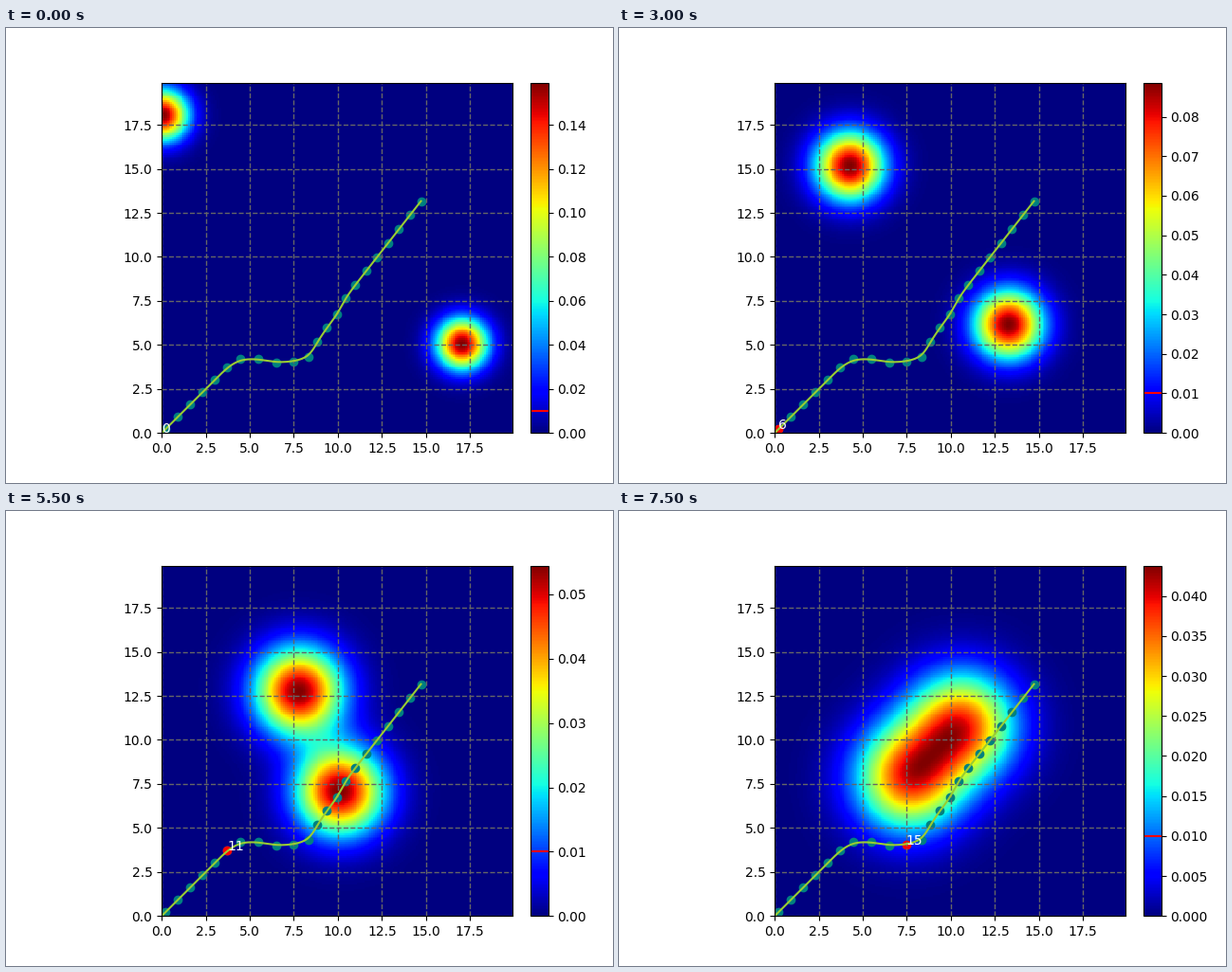
Write a matplotlib script that moves like this. It is 640 px wide and 480 px high and loops after 8 s.

```python
import numpy as np
import matplotlib.pyplot as plt
from matplotlib.animation import FuncAnimation

W, H, DPI = 640, 480, 100
STEPS = 16
START = 6          # step at which the walker sets off
LEVEL = 0.01       # threshold marked on the colorbar

grid = np.arange(0, 20, 0.1)
X, Y = np.meshgrid(grid[:-1], grid[:-1])

# (start, goal) of each moving obstacle, travelled in 27 steps
OBSTACLES = [((0, 18), (19, 5)), ((17, 5), (0, 10))]


def density(t):
    """Sum of two drifting Gaussians whose spread grows 5% per step."""
    var = 1.05 ** (2 * t)
    z = np.zeros_like(X)
    for a, b in OBSTACLES:
        cx, cy = np.array(a) + (np.array(b) - a) * t / 27
        z += np.exp(-((X - cx) ** 2 + (Y - cy) ** 2) / (2 * var))
    return z / (2 * np.pi * var)


def waypoints():
    climb = [(0.22 + 0.702 * k, 0.22 + 0.702 * k) for k in range(6)]
    bend = [(4.48, 4.2), (5.5, 4.2), (6.48, 4.0), (7.45, 4.05), (8.36, 4.3),
            (8.84, 5.18), (9.38, 5.98), (9.97, 6.74), (10.42, 7.64)]
    rise = [(10.99 + 0.621 * k, 8.41 + 0.793 * k) for k in range(7)]
    return np.array(climb + bend + rise)


def bspline(ctrl, n=12):
    """Uniform cubic B-spline pinned to both end points."""
    p = np.vstack([ctrl[:1]] * 2 + [ctrl] + [ctrl[-1:]] * 2)
    u = np.linspace(0, 1, n)[:, None]
    basis = ((1 - u) ** 3, 3 * u**3 - 6 * u**2 + 4,
             -3 * u**3 + 3 * u**2 + 3 * u + 1, u**3)
    return np.vstack([sum(b * q for b, q in zip(basis, p[i:i + 4])) / 6
                      for i in range(len(p) - 3)])


def px_axes(x, y, w, h):
    return fig.add_axes([x / W, y / H, w / W, h / H])


fig = plt.figure(figsize=(W / DPI, H / DPI), dpi=DPI)
ax = px_axes(164.2, 52.8, 369.6, 369.6)
cax = px_axes(553.4, 52.8, 18.48, 369.6)

mesh = ax.pcolormesh(grid, grid, density(0), cmap="jet", shading="flat", zorder=0)
cbar = fig.colorbar(mesh, cax=cax)
cax.axhline(LEVEL, color="red", lw=1.5)

pts = waypoints()
curve = bspline(np.vstack([[0, 0], pts]))
ax.scatter(*pts.T, color="teal", zorder=1)
walker = ax.scatter([0], [0], color="red", zorder=1.2)
ax.plot(*curve.T, color="yellowgreen", lw=1.5)
label = ax.text(0, 0, "0", color="white", zorder=3)

ax.set_xlim(0, 19.9)
ax.set_ylim(0, 19.9)
ax.set_xticks(np.arange(0, 19, 2.5))
ax.set_yticks(np.arange(0, 19, 2.5))
ax.grid(color="#666666", linestyle="--", lw=1)


def update(t):
    z = density(t)
    mesh.set_array(z)
    mesh.set_clim(0, z.max())
    moving = t >= START
    pos = pts[t - START] if moving else (0, 0)
    walker.set_visible(moving)
    walker.set_offsets([pos])
    label.set_position(pos)
    label.set_text(str(t))
    return mesh, walker, label


anim = FuncAnimation(fig, update, frames=STEPS, interval=500, blit=False, repeat=True)
plt.show()
```
